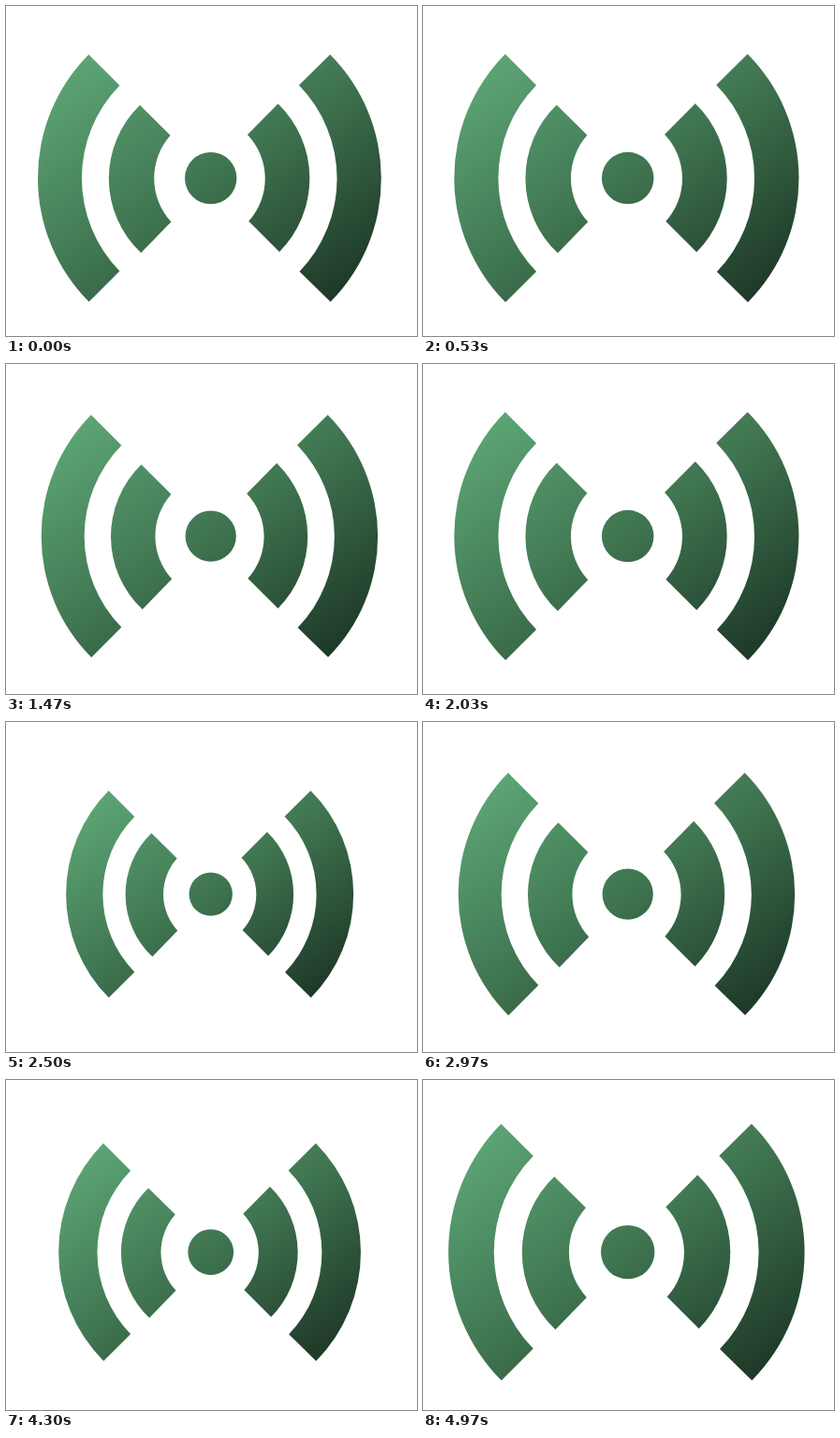
Animation, 439 px wide and 352 px high, one loop 5010 ms. Source, as an HTML page:

```html
<!DOCTYPE html>
<html lang="en">
<head>
<meta charset="utf-8">
<title>Broadcast pulse</title>
<style>
  html, body { margin: 0; width: 100%; height: 100%; overflow: hidden; background: #fff; }
  svg { display: block; width: 100vw; height: 100vh; }
</style>
</head>
<body>
<svg viewBox="0 0 439 352">
  <defs>
    <linearGradient id="green" x1="0" y1="0" x2="1" y2="1">
      <stop offset="0" stop-color="#61ad7b"/>
      <stop offset=".5" stop-color="#3f7450"/>
      <stop offset="1" stop-color="#182e20"/>
    </linearGradient>
  </defs>
  <path id="signal" fill="url(#green)" d="
    M88.3 51.7 L121.4 84.8 A141.3 141.3 0 0 0 121.4 282.8 L88.6 315.6 A187.1 187.1 0 0 1 88.3 51.7 Z
    M143 105.8 L175.6 138 A68.6 68.6 0 0 0 176.4 230.2 L144.2 263.3 A108.7 108.7 0 0 1 143 105.8 Z
    M191 183.6 a27.7 27.7 0 0 1 55.4 0 a27.7 27.7 0 0 1 -55.4 0 Z
    M290.6 104.2 L257.9 137.2 A67.8 67.8 0 0 1 259.2 229.6 L292 262.2 A111 111 0 0 0 290.6 104.2 Z
    M346.2 51.7 L312.9 84.5 A142.5 142.5 0 0 1 313.5 283.2 L346.6 315.5 A187.1 187.1 0 0 0 346.2 51.7 Z"/>
</svg>
<script>
  const LOOP = 5010, STEP = 100 / 3, LAST = 149, BEAT = 45;
  const CENTER = [218.8, 183.6];
  // [step within the beat, scale]
  const KEYS = [[0, 1], [7.4, 1.148], [16.1, 1.002], [34.3, 0.786], [BEAT, 1]];
  const signal = document.getElementById('signal');

  function scaleAt(step) {
    const i = KEYS.findIndex(([at]) => at > step);
    const [a, from] = KEYS[i - 1], [b, to] = KEYS[i];
    return from + (to - from) * (step - a) / (b - a);
  }

  function draw(ms) {
    const step = Math.min(LAST, Math.floor((ms % LOOP + 5) / STEP));
    const s = scaleAt(step % BEAT);
    const [x, y] = CENTER;
    signal.setAttribute('transform', `translate(${x} ${y}) scale(${s}) translate(${-x} ${-y})`);
  }

  const start = performance.now();
  function tick() {
    draw(performance.now() - start);
    requestAnimationFrame(tick);
  }
  tick();
</script>
</body>
</html>
```
